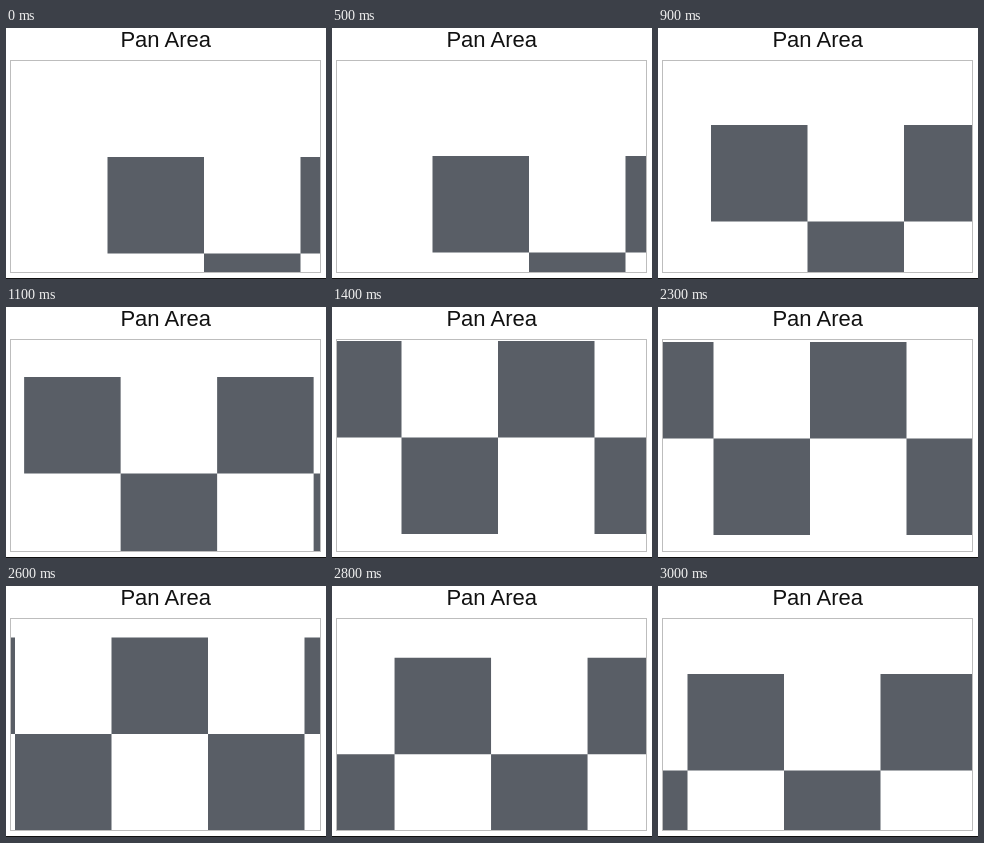
Write an HTML page that moves like this. It is 320 by 251 pixels and loops after 3600 ms.

```html
<!DOCTYPE html>
<html lang="en">
<head>
<meta charset="utf-8">
<title>Pan Area</title>
<style>
  html, body { margin: 0; width: 100%; height: 100%; overflow: hidden; background: #fff; }
  svg { display: block; }
  text { font: 22px Arial, "Liberation Sans", sans-serif; text-anchor: middle; fill: #111; }
</style>
</head>
<body>
<svg width="320" height="251" viewBox="0 0 320 251">
  <text x="159.7" y="19">Pan Area</text>
  <svg x="5" y="33" width="309" height="211" viewBox="5 33 309 211">
    <path id="board" fill="#595e66" d="M0 0h1v1h-1z M2 0h1v1h-1z M4 0h1v1h-1z M1 1h1v1h-1z M3 1h1v1h-1z"/>
  </svg>
  <rect x="4.5" y="32.5" width="310" height="212" fill="none" stroke="#bdbdbd"/>
  <rect y="250" width="320" height="1" fill="#111"/>
</svg>
<script>
const LOOP = 3600, STEP = 100, CELL = 96.5;
const board = document.getElementById('board');

// Drag path of the board's top left corner: [time, x, y]
const keys = [
  [0, 101.5, 129], [400, 101.5, 129], [500, 100.5, 128], [900, 53, 97],
  [1400, -27, 34], [2000, -27, 34], [2100, -29, 33.5], [2300, -41, 35],
  [2600, -87.5, 51.5], [3000, -163.5, 88], [LOOP, -163.5, 88]
];

function slope(i, axis) {
  const before = keys[Math.max(i - 1, 0)];
  const after = keys[Math.min(i + 1, keys.length - 1)];
  return (after[axis] - before[axis]) / (after[0] - before[0]);
}

// Smooth curve through the keys; equal neighbours are a rest
function position(time, axis) {
  const i = keys.findIndex(key => key[0] > time) - 1;
  const a = keys[i], b = keys[i + 1];
  if (a[axis] === b[axis]) return a[axis];
  const span = b[0] - a[0], u = (time - a[0]) / span, v = 1 - u;
  return v * v * (1 + 2 * u) * a[axis] + u * u * (1 + 2 * v) * b[axis]
    + u * v * span * (v * slope(i, axis) - u * slope(i + 1, axis));
}

function draw() {
  const time = Math.floor(performance.now() % LOOP / STEP) * STEP;
  board.setAttribute('transform',
    `translate(${position(time, 1)} ${position(time, 2)}) scale(${CELL})`);
  requestAnimationFrame(draw);
}
draw();
</script>
</body>
</html>
```
